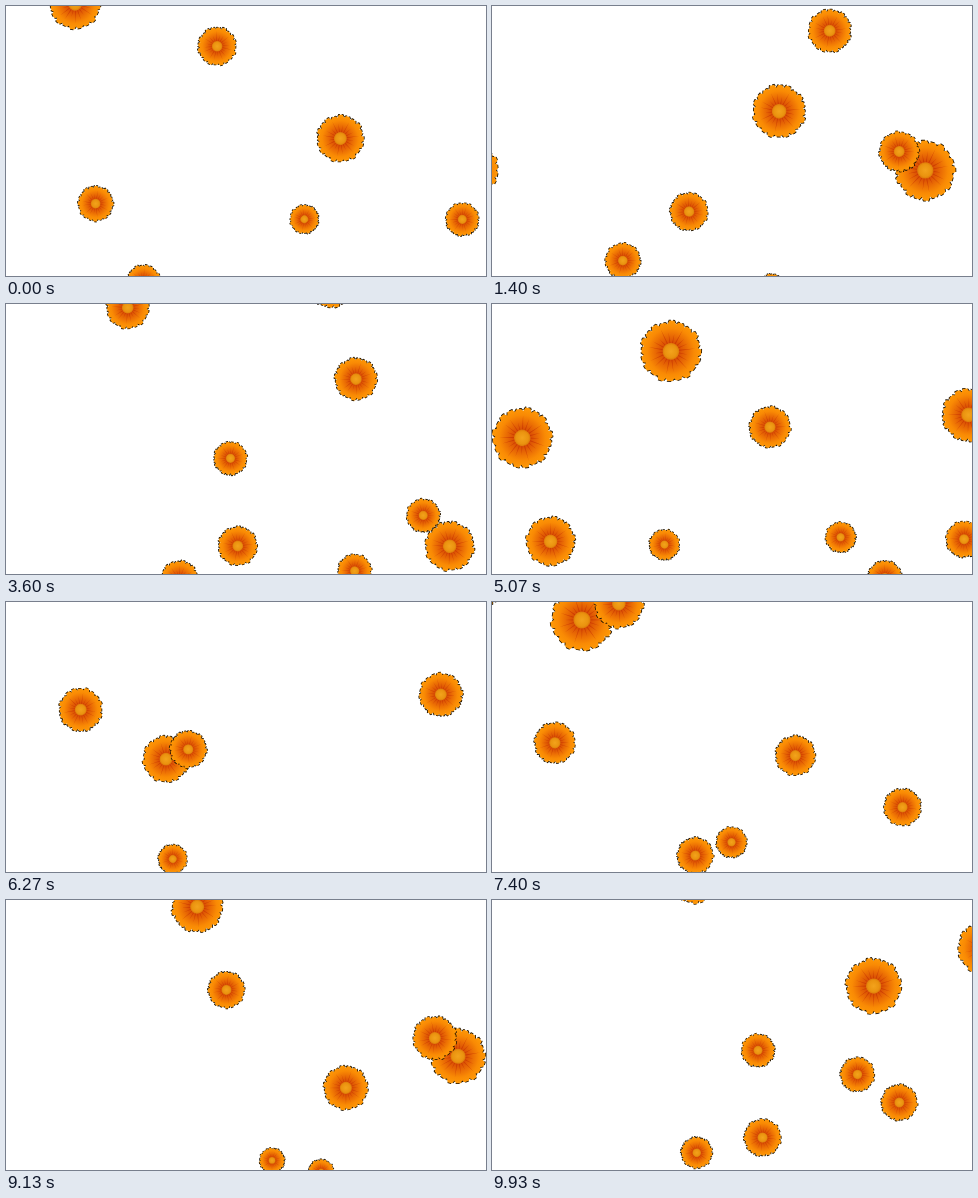
An HTML page with a canvas that plays this animation: 480x270 px, repeating every 10000 ms.

```html
<!DOCTYPE html>
<html>
<head>
<meta charset="utf-8">
<style>
html, body { margin: 0; overflow: hidden; background: #fff; }
canvas { display: block; }
</style>
</head>
<body>
<canvas id="stage" width="480" height="270"></canvas>
<script>
const ctx = document.getElementById('stage').getContext('2d');
const TAU = Math.PI * 2;

// Flowers burst from a point below the stage, fly straight out and grow.
const ORIGIN = { x: 266, y: 368 };
const FPS = 15, FRAMES = 150;
const SPEED = 9.168;   // px per frame
const SPACING = 87.1;  // px between bursts
const FIRST_BURST = -4;

// Each burst: [degrees from vertical, birth radius, optional range in px]
const bursts = [
  [[-28, 9.2]],
  [[-9.5, 8]],
  [[16.2, 11.6], [-46, 8.7], [50.9, 8.2]],
  [[-54.3, 10.2], [11.8, 8.7]],
  [[39.4, 14.2], [4.6, 12.6], [32.4, 9.5]],
  [[-23, 11], [-50, 10.2]],
  [[8.7, 8.7], [-21.6, 8]],
  [[16, 9.3]],
  [[54.7, 12.9], [-11, 8.75], [44, 8.75]],
  [[-15.2, 12.7], [-45.2, 12.5], [39.3, 11]],
  [[-57.8, 12.1], [2.8, 10.2], [57.2, 9]],
  [[53.4, 10.4], [-36.3, 9.2], [31.5, 9.2]],
  [[-26.7, 11.7], [-20.8, 9.3]],
  [[-41.8, 9]],
  [[9.9, 10.5], [41.6, 9.8]],
  [[-28.7, 11.8, 328], [-11.7, 10]],
  [[41.3, 12.6], [35.3, 10], [-9.3, 8.4]],
  [[22.3, 12.2]],
  [[40.5, 9.5], [27.2, 9], [0, 8.7]],
  [[2, 12.1], [-28, 10.2]]
];

const polar = (angle, radius) => [Math.cos(angle) * radius, Math.sin(angle) * radius];

// Unit-radius shapes, scaled for every flower
const PETALS = 20;
const outline = new Path2D();
const streaks = new Path2D();
for (let i = 0; i < PETALS; i++) {
  const a = i * TAU / PETALS, step = TAU / PETALS;
  const tip = 0.97 + 0.03 * Math.sin(i * 2.4);
  outline.lineTo(...polar(a, 0.88));
  outline.lineTo(...polar(a + step * 0.22, tip));
  outline.lineTo(...polar(a + step * 0.75, tip));
  const length = 0.66 + 0.14 * Math.sin(i * 4.1);
  streaks.moveTo(...polar(a - 0.08, 0.24));
  streaks.lineTo(...polar(a, length));
  streaks.lineTo(...polar(a + 0.08, 0.24));
}
outline.closePath();

function gradient(...stops) {
  const g = ctx.createRadialGradient(0, 0, 0, 0, 0, 1);
  for (const [at, color] of stops) g.addColorStop(at, color);
  return g;
}
const petalFill = gradient([0.25, '#d84c04'], [0.5, '#e96a04'], [0.75, '#f98a04'], [1, '#ff9a06']);
const heartFill = gradient([0, '#f3a31c'], [0.2, '#ea930f'], [0.28, '#dc7408']);

function drawFlower(x, y, radius, turn) {
  ctx.save();
  ctx.translate(x, y);
  ctx.rotate(turn);
  ctx.scale(radius, radius);
  ctx.lineWidth = 1.6 / radius;
  ctx.setLineDash([0.13, 0.07]);
  ctx.strokeStyle = '#1a1000';
  ctx.stroke(outline);
  ctx.fillStyle = petalFill;
  ctx.fill(outline);
  ctx.fillStyle = 'rgba(196, 48, 0, 0.6)';
  ctx.fill(streaks);
  ctx.fillStyle = heartFill;
  ctx.beginPath();
  ctx.arc(0, 0, 0.27, 0, TAU);
  ctx.fill();
  ctx.restore();
}

function draw(ms) {
  const frame = Math.floor(ms * FPS / 1000 + 0.1) % FRAMES;
  ctx.fillStyle = '#fff';
  ctx.fillRect(0, 0, 480, 270);
  bursts.forEach((burst, i) => {
    const distance = 71 + frame * SPEED - (i + FIRST_BURST) * SPACING;
    if (distance < 0) return;
    for (const [degrees, size, range = 600] of burst) {
      if (distance > range) continue;
      const a = degrees * TAU / 360;
      drawFlower(
        ORIGIN.x + Math.sin(a) * distance,
        ORIGIN.y - Math.cos(a) * distance,
        size * (1 + distance / 230),
        degrees
      );
    }
  });
}

const start = performance.now();
function tick() {
  draw((performance.now() - start) % 10000);
  requestAnimationFrame(tick);
}
tick();
</script>
</body>
</html>
```
